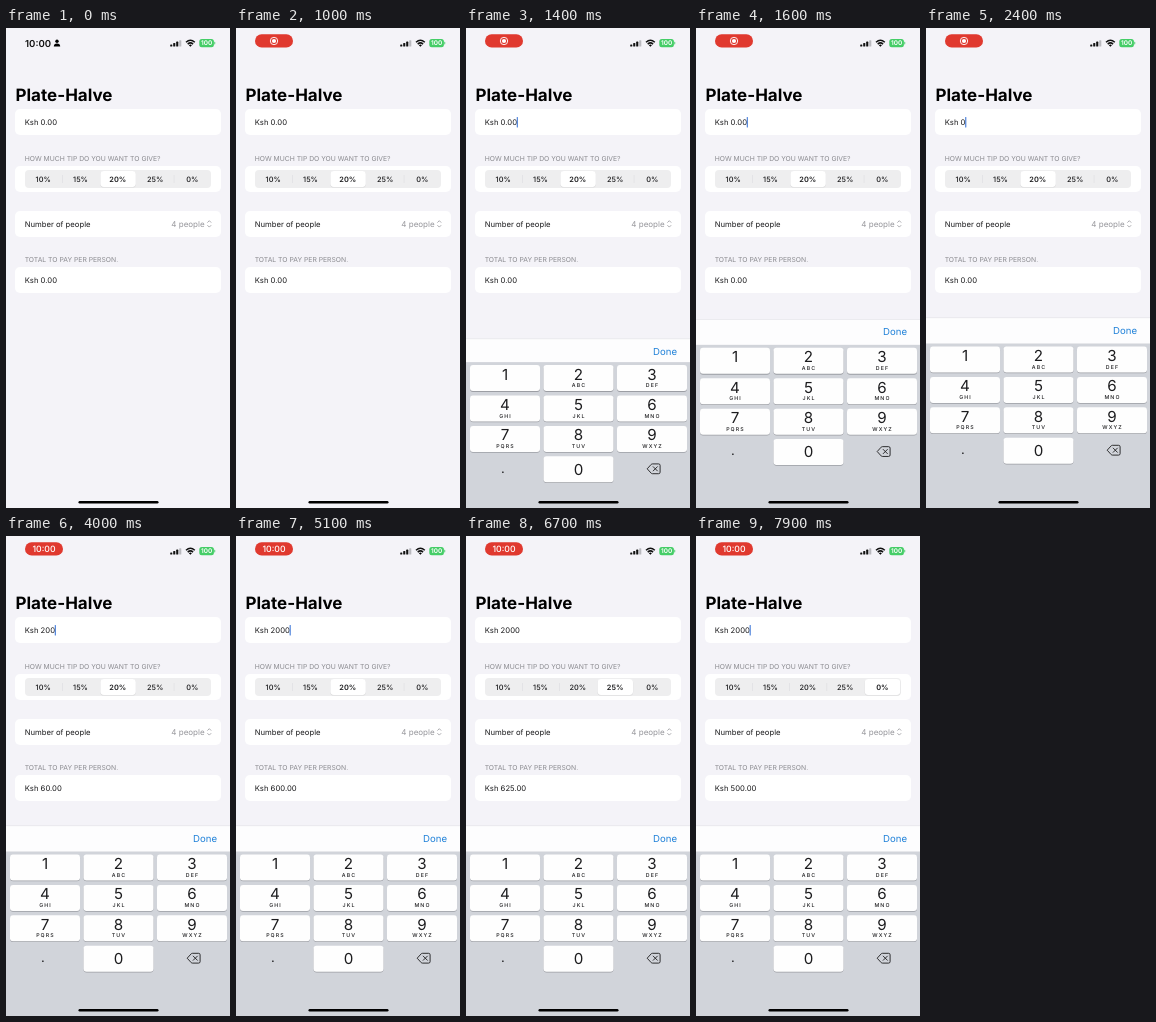
An HTML page for the animation above (8000 ms loop, 224x480 px).

```html
<!DOCTYPE html>
<html lang="en">
<head>
<meta charset="utf-8">
<title>Bill calculator</title>
<style>
html, body { margin: 0; height: 100%; overflow: hidden; background: #f4f3f8; }
svg { display: block; width: 100%; height: 100%; font-family: Inter, "Liberation Sans", sans-serif; }
text { white-space: pre; text-rendering: geometricPrecision; }
</style>
</head>
<body>
<svg id="stage" viewBox="0 0 224 480"></svg>
<script>
const LOOP = 8000, HOLD = 130, BODY = 7.7, CAPS = 6.8;
const stage = document.getElementById('stage');
const pen = document.createElement('canvas').getContext('2d');
const tips = [10, 15, 20, 25, 0];
const letters = ['', 'ABC', 'DEF', 'GHI', 'JKL', 'MNO', 'PQRS', 'TUV', 'WXYZ'];
// [touch time, key]; the text changes on release
const taps = [[1800, 'del'], [2000, 'del'], [2200, 'del'], [2700, 'del'],
  [3050, '2'], [3450, '0'], [3850, '0'], [4250, '0']];
// [time, chosen segment]
const picks = [[0, 2], [6000, 3], [7250, 4]];

const clamp = v => Math.min(1, Math.max(0, v));
const ease = v => { v = clamp(v); return v * v * (3 - 2 * v); };
const box = (x, y, w, h, r, fill, more = '') =>
  `<rect x="${x}" y="${y}" width="${w}" height="${h}" rx="${r}" fill="${fill}" ${more}/>`;
const text = (s, x, y, size, fill = '#1c1c1e', more = '') =>
  `<text x="${x}" y="${y}" font-size="${size}" fill="${fill}" ${more}>${s}</text>`;
const path = (d, more) => `<path d="${d}" ${more}/>`;
const mid = 'text-anchor="middle" ';

function statusBar(t) {
  const pill = ease((t - 300) / 150);
  const clock = ease((t - 3000) / 150);
  let s = `<g opacity="${1 - pill}">` + text('10:00', 19, 18.6, 9.6, '#111', 'font-weight="600"') +
    '<circle cx="51" cy="13.3" r="1.7"/>' +
    path('M47.8 18.5q0-3.1 3.2-3.1t3.2 3.1z', '') + '</g>';
  s += `<g opacity="${pill}">` + box(19, 6.3, 38, 13.2, 6.6, '#e0392f') +
    `<g opacity="${1 - clock}"><circle cx="38" cy="13" r="3.7" fill="none" stroke="#fff" stroke-width="0.9"/>` +
    '<circle cx="38" cy="13" r="2.1" fill="#fff"/></g>' +
    text('10:00', 38, 16.3, 8.7, '#fff', mid + `font-weight="500" opacity="${clock}"`) + '</g>';
  for (let i = 0; i < 4; i++) {
    const h = 2.2 + i * 1.4;
    s += box(164.2 + i * 3, 18.6 - h, 2.1, h, 0.6, i < 3 ? '#111' : '#b9b9be');
  }
  s += path('M180 14.2q4.4-3.9 8.8 0M181.7 16.1q2.7-2.4 5.4 0',
    'fill="none" stroke="#111" stroke-width="1.5"') +
    path('M182.9 17.2q1.5-1.2 3 0l-1.5 1.6z', '') +
    box(193.3, 11, 14.6, 8.2, 2.5, '#45cd67') + box(208.3, 13.7, 0.9, 2.8, 0.4, '#45cd67') +
    text('100', 200.6, 17.4, 6.4, '#fff', mid + 'font-weight="600"');
  return s;
}

function entry(t) {
  let s = '0.00';
  for (const [at, key] of taps)
    if (t >= at + HOLD) s = key === 'del' ? s.slice(0, -1) : s + key;
  return s;
}

function form(t) {
  const amount = entry(t), line = 'Ksh ' + amount;
  const n = picks.filter(p => t >= p[0]).length - 1;
  const [at, pick] = picks[n];
  const from = n ? picks[n - 1][1] : pick;
  const pos = from + (pick - from) * ease((t - at) / 250);
  const total = Number(amount) * (1 + tips[pick] / 100) / 4;

  let s = text('Plate-Halve', 9.5, 73, 17, '#000', 'font-weight="700"');
  for (const y of [81, 138, 183, 239]) s += box(9, y, 206, 26, 5, '#fff');
  s += text(line, 18.7, 97.2, BODY);
  pen.font = `${BODY * 10}px Inter, "Liberation Sans", sans-serif`;
  if (t > 1150 && (t < 4800 || (t + 200) % 1000 < 500))
    s += box(18.4 + pen.measureText(line).width / 10, 89, 1.1, 10.5, 0.5, '#3f78d8');

  s += text('HOW MUCH TIP DO YOU WANT TO GIVE?', 18.7, 133, CAPS, '#8c8c91');
  s += box(19, 142, 186, 18, 4, '#eeeeef');
  for (let i = 1; i < 5; i++)
    if (Math.abs(i - 0.5 - pos) > 0.7) s += box(19 + i * 37.2, 147, 0.5, 8, 0, '#d9d9dc');
  s += box(19.8 + pos * 37.2, 143.2, 35.8, 16.4, 3.6, '#000', 'opacity="0.09"') +
    box(20 + pos * 37.2, 143, 35.4, 16, 3.4, '#fff');
  tips.forEach((tip, i) => {
    const weight = i === pick ? 600 : 500;
    s += text(tip + '%', 37.2 + i * 37.3, 153.7, 7.4, '#1c1c1e', mid + `font-weight="${weight}"`);
  });

  s += text('Number of people', 18.7, 198.6, BODY) +
    text('4 people', 198.6, 198.6, 8, '#97979c', 'text-anchor="end"') +
    path('M201.4 194.6l1.9-1.9 1.9 1.9M201.4 197.2l1.9 1.9 1.9-1.9',
      'fill="none" stroke="#97979c" stroke-width="0.8"') +
    text('TOTAL TO PAY PER PERSON.', 18.7, 234.2, CAPS, '#8c8c91') +
    text('Ksh ' + total.toFixed(2), 18.7, 254.8, BODY);
  return s;
}

function keyboard(t) {
  if (t < 1150) return '';
  const p = (t - 1150) * 0.0156;
  const drop = 190 * (1 + p) * Math.exp(-p);
  const held = taps.find(([at]) => t >= at && t < at + HOLD);
  const down = held ? held[1] : '';
  const key = (label, col, row, sub) => {
    const x = 4 + col * 73.5, y = 318.5 + row * 30.4, cx = x + 35;
    return box(x, y + 0.8, 70, 26, 3, '#9c9ea4') +
      box(x, y, 70, 26, 3, down === label ? '#b7c1d1' : '#fefefe') +
      text(label, cx, y + (label === '0' ? 18.4 : 14.4), 15.2, '#1c1c1e', mid) +
      (sub ? text(sub, cx + 0.5, y + 22, 5.3, '#1c1c1e', mid + 'font-weight="500" letter-spacing="1.1"') : '');
  };
  const lag = drop * 0.13;
  let s = box(0, 290 + lag, 224, 26, 0, '#fdfdfe') + box(0, 289.6 + lag, 224, 0.5, 0, '#dddde1') +
    box(0, 315.5, 224, 165, 0, '#d1d4da') +
    text('Done', 211, 305.7 + lag, 9.6, '#1f80d8', 'text-anchor="end"');
  letters.forEach((sub, i) => s += key(String(i + 1), i % 3, Math.floor(i / 3), sub));
  s += key('0', 1, 3) + text('.', 36.8, 426, 13, '#1c1c1e', mid);
  const on = down === 'del';
  s += path('M181.2 422.2l4-4.4q.5-.5 1.2-.5h6.2q1.5 0 1.5 1.5v6.8q0 1.5-1.5 1.5h-6.2q-.7 0-1.2-.5z',
    `fill="${on ? '#1c1c1e' : 'none'}" stroke="#1c1c1e" stroke-width="0.9" stroke-linejoin="round"`) +
    path('M187.2 420.1l4.2 4.2M191.4 420.1l-4.2 4.2',
      `stroke="${on ? '#fff' : '#1c1c1e'}" stroke-width="0.9" stroke-linecap="round"`);
  return `<g transform="translate(0 ${drop})">${s}</g>`;
}

function draw() {
  const t = performance.now() % LOOP;
  stage.innerHTML = box(0, 0, 224, 480, 0, '#f4f3f8') + statusBar(t) + form(t) + keyboard(t) +
    box(72.5, 473.1, 80, 2.5, 1.25, '#000');
  requestAnimationFrame(draw);
}
draw();
</script>
</body>
</html>
```
